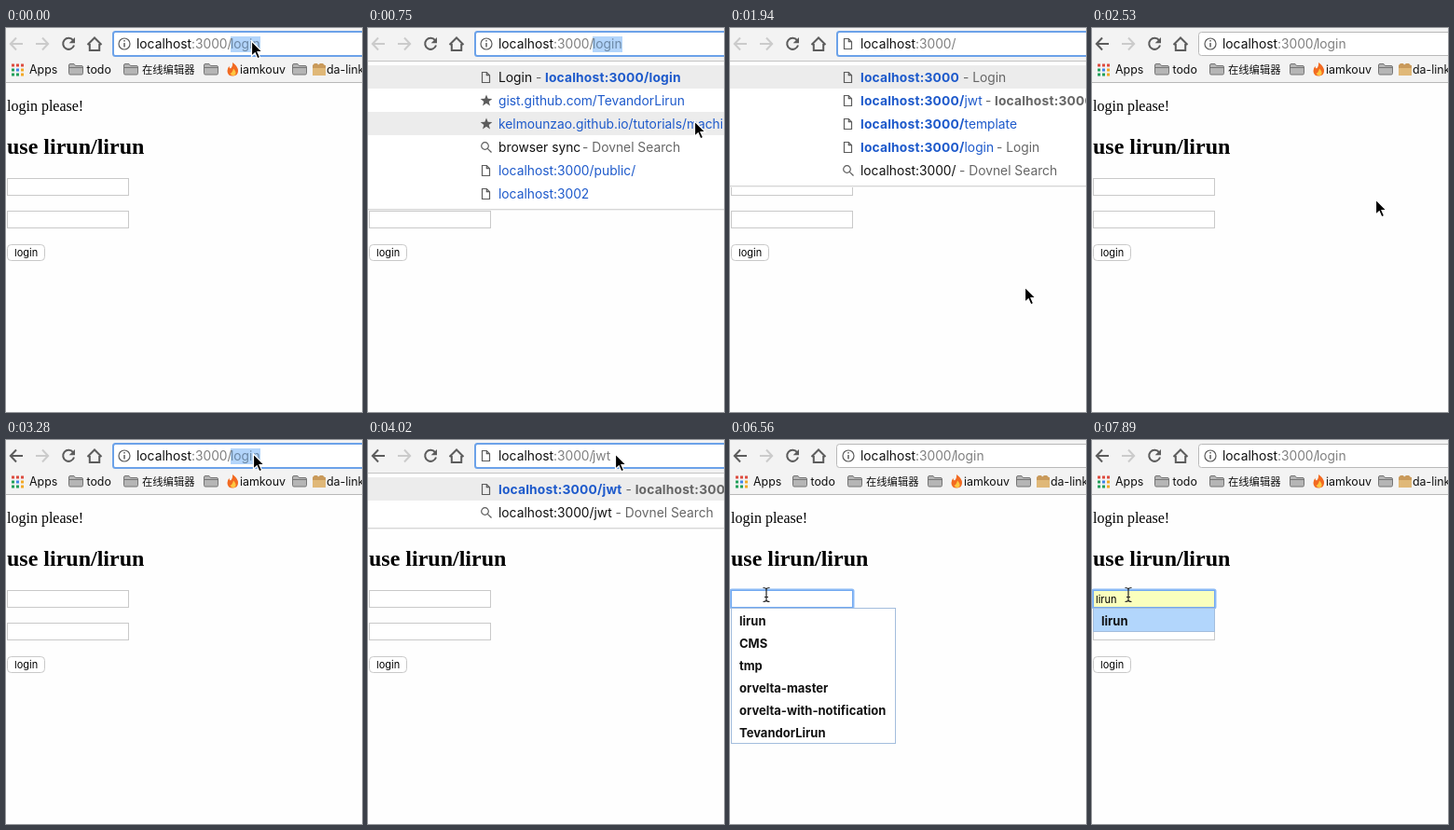
Write an HTML page that moves like this. It is 382x412 px and loops after 8000 ms.

```html
<!DOCTYPE html>
<html lang="en">
<head>
<meta charset="utf-8">
<title>Login redirect</title>
<style>
html, body { margin: 0; width: 100%; height: 100%; overflow: hidden; background: #fefefe; }
svg { display: block; width: 382px; height: 412px; }
text { white-space: pre; font: 13.8px Inter, Roboto, sans-serif; fill: #111; }
.serif { font: 16px "Liberation Serif", serif; fill: #000; }
.serif.big { font-size: 24px; font-weight: bold; }
.mark { font-size: 12.4px; }
.cjk { font: 11.3px "Noto Sans CJK SC", "Noto Sans CJK", sans-serif; }
.small { font-size: 11px; fill: #000; }
.option { font-size: 13px; font-weight: 700; fill: #111; }
.port { fill: #808080; }
.picked { fill: #6c88a5; }
.note { fill: #666; }
.link { fill: #1e5acb; }
.bold { font-weight: 700; letter-spacing: .18px; }
.line { fill: none; stroke: #5c5c5c; stroke-width: 1.2; }
.nav { fill: none; stroke: #5c5c5c; stroke-width: 2; }
.off { stroke: #cbcbcb; }
.box { fill: #fff; stroke: #c9c9c9; }
</style>
</head>
<body>
<svg viewBox="0 0 382 412">
  <defs>
    <g id="doc"><path class="line" d="M-4.500 -5.500h4.800l3.200 3.200v7.800h-8zM.3 -5.500v3.200h3.200"/></g>
    <g id="star"><path fill="#5c5c5c" d="M0 -6.5 1.7 -2.2 6.3 -2 2.7 .9 4 5.4 0 2.8 -4 5.4 -2.7 .9 -6.3 -2 -1.7 -2.2z"/></g>
    <g id="find"><circle class="line" cx="-1.5" cy="-1.5" r="3.8"/><path class="line" d="M1.3 1.3 5.5 5.5"/></g>
    <g id="folder"><path fill="#b5b5b5" stroke="#757575" d="M.5 2Q.5 .5 2 .5h4l1.5 2h6.5q1.5 0 1.5 1.5v6.5q0 1.5-1.5 1.5H2Q.5 12 .5 10.5z"/><path stroke="#757575" d="M1 4.5h14"/></g>
  </defs>

  <g id="page">
    <rect width="382" height="412" fill="#fefefe"/>
    <text class="serif" x="1" y="89">login please!</text>
    <text class="serif big" x="1" y="135">use lirun/lirun</text>
    <rect class="box" x="1.5" y="161.5" width="130" height="18"/>
    <rect class="box" x="1.5" y="196.5" width="130" height="18"/>
    <rect class="box" x="1.5" y="232.5" width="40" height="17" rx="4"/>
    <text class="small" x="9" y="245">login</text>
    <g data-show="field=on">
      <rect x="1" y="161" width="131" height="19" rx="1" fill="none" stroke="#8dbbf6" stroke-width="3"/>
      <rect id="fill" x="1.5" y="161.5" width="130" height="18" stroke="#73aaf1"/>
      <text id="typed" class="small" x="4" y="175"></text>
      <rect id="caret" y="164" width="1" height="13" fill="#000"/>
    </g>
    <g id="list"></g>
  </g>

  <g id="bookmarks">
    <rect width="382" height="59" fill="#f3f3f3"/>
    <path stroke="#b8b8b8" d="M0 58.5h382"/>
    <g id="apps"></g>
    <text class="mark" x="25" y="49">Apps</text>
    <text class="mark" x="86.5" y="49">todo</text>
    <text class="cjk" x="146" y="49">在线编辑器</text>
    <text class="mark" x="251" y="49">iamkouv</text>
    <text class="mark" x="344" y="49">da-link</text>
    <use href="#folder" x="67" y="38"/><use href="#folder" x="126" y="38"/>
    <use href="#folder" x="212" y="38"/><use href="#folder" x="307" y="38"/>
    <path fill="#f26a21" d="M243 37q6 4 6 9t-5.500 5.500q-6 0-6-5.500 0-3 2-5 0 2 1.500 2.500 2.500-2.500 2-6.500z"/>
    <path fill="#fdc741" d="M244 43.500q3 3 2.500 5.500t-3 2-3-2.500q1 0 1.500-.5 1.500-2 2-4.500z"/>
    <path fill="#c99a5b" d="M329 40l2-2h3l1 1.500 2-1.500h3l2 2h1v11h-14z"/><path fill="#e0b878" d="M329 43h14v8h-14z"/>
  </g>

  <g id="popups"></g>

  <g id="toolbar">
    <path id="back" class="nav" d="M18 17H5M11 10.500 4.800 17 11 23.500"/>
    <path class="nav off" d="M32 17h13M39 10.500 45.200 17 39 23.500"/>
    <path class="nav" d="M72 13.200A6 6 0 1 0 73 18.500"/><path fill="#5c5c5c" d="M74 10v6.300h-6.300z"/>
    <path class="nav" d="M87.500 18 95 10.500 102.500 18M89.800 17v7h10.400v-7"/>
    <rect data-show="focus=" x="114.500" y="4.500" width="300" height="25" rx="3" fill="#fff" stroke="#b9b9b9"/>
    <rect data-show="focus=on" x="115" y="4" width="300" height="26" rx="2.500" fill="#fff" stroke="#6ca2e9" stroke-width="2"/>
    <g data-show="url=login"><circle class="line" cx="127" cy="17" r="6"/><path stroke="#5c5c5c" stroke-width="1.500" d="M127 13v1.600M127 16v4.500"/></g>
    <use data-hide="url=login" href="#doc" x="127" y="17"/>
    <rect data-show="selected=on" x="241" y="9" width="32" height="17" fill="#b3d5fb"/>
    <text x="140" y="22">localhost<tspan class="port">:3000/</tspan><tspan id="path" x="241"></tspan></text>
  </g>

  <g id="pointer">
    <path data-show="beam=" fill="#000" stroke="#fff" stroke-width="1.200" d="M.5 -1v16.300l3.700-3.500 2.600 6 2.800-1.200-2.600-5.900h5z"/>
    <path data-show="beam=on" fill="none" stroke="#222" stroke-width="1.200" d="M-3.500 -7.500q3 0 3.500 1.500 .5-1.500 3.500-1.500M-3.500 7.500q3 0 3.500-1.500 .5 1.500 3.500 1.500M0 -6v12M-2 2.500h4"/>
  </g>
</svg>
<script>
const $ = id => document.getElementById(id);
const span = (cls, text, x) => `<tspan class="${cls}"${x ? ` x="${x}"` : ''}>${text}</tspan>`;
const link = text => span('link', text);
const strong = text => span('link bold', text);
const note = (text, x) => span('note', text, x);
const host = 'localhost:3000';

const suggestions = {
  recent: [
    ['doc', 'Login' + note(' - ') + span('link bold', host + '/login', 190)],
    ['star', link('gist.github.com/TevandorLirun')],
    ['star', link('kelmounzao.github.io/tutorials/machine-learning')],
    ['find', 'browser sync' + note('- Dovnel Search', 230)],
    ['doc', link(host + '/public/')],
    ['doc', link('localhost:3002')]
  ],
  root: [
    ['doc', strong(host) + note('- Login', 250)],
    ['doc', strong(host + '/') + link('jwt') + note('- ', 274) + span('note bold', host + '/jwt', 284)],
    ['doc', strong(host + '/') + link('template')],
    ['doc', strong(host + '/') + link('login') + note('- Login', 286)],
    ['find', host + '/' + note('- Dovnel Search', 246)]
  ],
  jwt: [
    ['doc', strong(host + '/jwt') + note(' - ') + span('note bold', host + '/jwt')],
    ['find', host + '/jwt' + note(' - Dovnel Search')]
  ]
};

function popup([name, rows]) {
  const bottom = 44 + rows.length * 25;
  const band = (i, show = '') => `<rect y="${40 + i * 25}" width="382" height="25" fill="#ececec" ${show}/>`;
  const body = rows.map(([icon, text], i) =>
    `<use href="#${icon}" x="127" y="${53 + i * 25}"/><text x="140" y="${58 + i * 25}">${text}</text>`).join('');
  return `<g data-show="popup=${name}">
    <rect y="35" width="382" height="${bottom - 35}" fill="#fff"/>
    <path stroke="#c4c4c4" d="M0 35.500h382"/>
    <path stroke="#d6d6d6" d="M0 ${bottom + .5}h382"/><path stroke="#f0f0f0" d="M0 ${bottom + 1.5}h382"/>
    ${band(0)}${band(2, 'data-show="hover=on"')}${body}</g>`;
}

function optionList(name, width, options, color = '#fff') {
  const body = options.map((text, i) =>
    `<text class="option" x="10" y="${199 + i * 24}">${text}</text>`).join('');
  return `<g data-show="list=${name}"><rect x="1.500" y="180.500" width="${width}"
    height="${options.length * 24 + 1}" fill="${color}" stroke="#a3bddd"/>${body}</g>`;
}

$('popups').innerHTML = Object.entries(suggestions).map(popup).join('');
$('list').innerHTML =
  optionList('all', 176, ['lirun', 'CMS', 'tmp', 'orvelta-master', 'orvelta-with-notification', 'TevandorLirun']) +
  optionList('one', 130, ['lirun']) + optionList('hit', 130, ['lirun'], '#b2d6fc');

const [red, green, blue, amber] = ['#dd4b3e', '#23a05a', '#4285e8', '#f2a825'];
$('apps').innerHTML = [red, red, red, green, blue, amber, green, green, amber].map((color, i) =>
  `<rect x="${6 + i % 3 * 5}" y="${38.5 + Math.floor(i / 3) * 5}" width="3" height="3" fill="${color}"/>`).join('');

const start = { at: [263, 15], beam: '', url: 'login', focus: 'on', selected: 'on', popup: '', hover: '',
  back: '', field: '', list: '', typed: '', caret: 0, fill: '#fff' };
const steps = [
  [150, { popup: 'recent' }],
  [300, { at: [271, 21] }],
  [750, { at: [350, 101], hover: 'on' }],
  [890, { at: [360, 180], hover: '' }],
  [1040, { at: [338, 250] }],
  [1190, { at: [316, 279] }],
  [1340, { url: '', selected: '', popup: 'root' }],
  [2080, { url: 'login', focus: '', popup: '', back: 'on' }],
  [2380, { at: [313, 250] }],
  [2530, { at: [304, 185] }],
  [2680, { at: [290, 105] }],
  [2830, { at: [275, 45] }],
  [2980, { at: [266, 18] }],
  [3130, { at: [265, 16], focus: 'on' }],
  [3280, { selected: 'on' }],
  [3580, { popup: 'recent' }],
  [3870, { url: 'j', selected: '', popup: 'root' }],
  [4020, { url: 'jwt', popup: 'jwt' }],
  [4320, { url: 'login', focus: '', popup: '' }],
  [4470, { at: [248, 90] }],
  [4620, { at: [210, 215] }],
  [4770, { at: [170, 298] }],
  [4920, { at: [143, 240] }],
  [5070, { at: [134, 209] }],
  [5810, { at: [65, 172], beam: 'on' }],
  [5960, { at: [39, 166], field: 'on', caret: 4 }],
  [6110, { list: 'all' }],
  [6560, { caret: 0 }],
  [7150, { typed: 'l', caret: 7 }],
  [7300, { list: 'one' }],
  [7750, { list: 'hit', caret: 0 }],
  [7890, { typed: 'lirun', fill: '#faffbd' }]
];

const toggles = [...document.querySelectorAll('[data-show], [data-hide]')].map(el => {
  const [key, value] = (el.dataset.show || el.dataset.hide).split('=');
  return { el, key, value, shown: 'show' in el.dataset };
});

function draw(time) {
  const state = Object.assign({}, start, ...steps.filter(([t]) => t <= time).map(([, patch]) => patch));
  for (const { el, key, value, shown } of toggles)
    el.style.display = (state[key] === value) === shown ? '' : 'none';
  $('pointer').setAttribute('transform', `translate(${state.at})`);
  $('back').classList.toggle('off', !state.back);
  $('path').textContent = state.url;
  $('path').setAttribute('class', state.selected ? 'picked' : 'port');
  $('typed').textContent = state.typed;
  $('fill').setAttribute('fill', state.fill);
  $('caret').setAttribute('x', state.caret);
  $('caret').style.display = state.caret ? '' : 'none';
}

const begin = performance.now();
function tick() {
  draw((performance.now() - begin) % 8000);
  requestAnimationFrame(tick);
}
tick();
</script>
</body>
</html>
```
